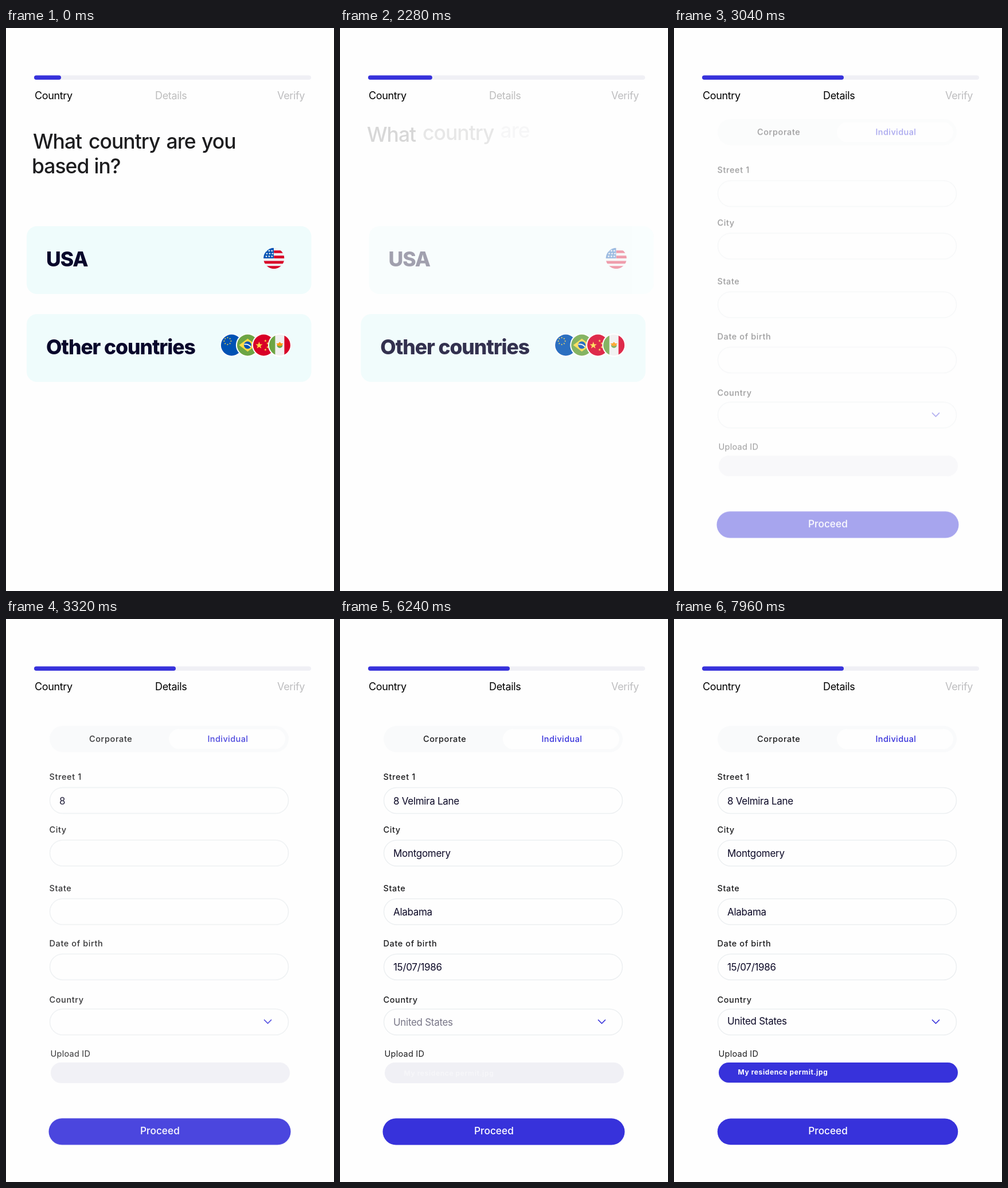
An HTML page that plays this animation: 572x980 px, repeating every 8 s.

```html
<!DOCTYPE html>
<html lang="en">
<head>
<meta charset="utf-8">
<title>Onboarding form</title>
<style>
html, body { margin: 0; width: 100%; height: 100%; overflow: hidden; background: #fefefe; }
svg { display: block; width: 100vw; height: 100vh; font-family: Inter, "Open Sans", sans-serif; }
.step { font-size: 18px; letter-spacing: -.35px; }
.heading { font-size: 35.5px; font-weight: 500; letter-spacing: -1px; fill: #1d1d1f; }
.option { font-size: 35.5px; font-weight: 800; letter-spacing: -1.1px; fill: #09072b; }
.label { font-size: 14.5px; font-weight: 500; letter-spacing: .6px; fill: #1c1c1e; }
.value { font-size: 17px; letter-spacing: -.3px; fill: #0b0826; }
.field { fill: none; stroke: #eceff1; stroke-width: 1.5; }
</style>
</head>
<body>
<svg id="stage" viewBox="0 0 572 980">
  <defs>
    <clipPath id="disc"><circle r="18.5"/></clipPath>
  </defs>

  <rect x="49" y="82.5" width="483" height="7.5" rx="3.75" fill="#f0f0f5"/>
  <rect id="progress" x="49" y="82.5" height="7.5" rx="3.75" fill="#3732db"/>
  <g class="step">
    <text x="50" y="124">Country</text>
    <text id="details" x="260" y="124">Details</text>
    <text x="473" y="124" fill="#bdbdbf">Verify</text>
  </g>

  <g id="heading" class="heading"></g>

  <g id="usa">
    <rect x="36" y="345" width="496.5" height="118" rx="18" fill="#effcfc"/>
    <text class="option" x="70" y="415">USA</text>
    <g transform="translate(467.2 401) scale(.98)" clip-path="url(#disc)">
      <circle r="18.5" fill="#f0f0f0"/>
      <path d="M0-11.8H19M0-2.4H19M-19 7H19M-19 15.9H19" stroke="#d80027" stroke-width="4.7"/>
      <path d="M-19-19H-.3V0H-19z" fill="#0052b4"/>
      <g id="usStars" fill="#f0f0f0"></g>
    </g>
  </g>

  <g id="other">
    <rect x="36" y="498" width="496.5" height="118" rx="18" fill="#effcfc"/>
    <text class="option" x="70" y="568">Other countries</text>
    <g transform="translate(393.4 552)">
      <circle r="20.5" fill="#fff"/>
      <circle r="18.5" fill="#0052b4"/>
      <g id="euStars" fill="#ffda44"></g>
    </g>
    <g transform="translate(421.4 552)">
      <circle r="20.5" fill="#fff"/>
      <circle r="18.5" fill="#6da544"/>
      <path d="M0-11.3L15 0L0 11.3L-15 0z" fill="#ffda44"/>
      <circle r="6.5" fill="#0052b4"/>
      <path d="M-6-1.2Q1-2.5 5.6 3" fill="none" stroke="#f0f0f0" stroke-width="2"/>
    </g>
    <g transform="translate(449.4 552)">
      <circle r="20.5" fill="#fff"/>
      <circle r="18.5" fill="#d80027"/>
      <g id="cnStars" fill="#ffda44"></g>
    </g>
    <g transform="translate(477.4 552)">
      <circle r="20.5" fill="#fff"/>
      <g clip-path="url(#disc)">
        <circle r="18.5" fill="#f0f0f0"/>
        <path d="M-19-19H-8V19H-19z" fill="#6da544"/>
        <path d="M8-19H19V19H8z" fill="#d80027"/>
        <path d="M-5 0A5 5 0 0 0 5 0z" fill="#6da544"/>
        <path d="M-6-3L-2.5-3L0-5.5L2.5-3L6-3L3 1.5H-3z" fill="#ff9811"/>
      </g>
    </g>
  </g>

  <g id="form">
    <rect x="76" y="186" width="417" height="46" rx="23" fill="#f9fafb"/>
    <rect x="284" y="191.5" width="203" height="35" rx="17.5" fill="#fefefe"/>
    <g class="label">
      <text x="145" y="213.5">Corporate</text>
      <text x="351.5" y="213.5" style="fill:#3732db;letter-spacing:.4px">Individual</text>
    </g>
    <g id="fields"></g>
    <path d="M450.5 698L456.5 704L462.5 698" fill="none" stroke="#3732db" stroke-width="1.7" stroke-linecap="round" stroke-linejoin="round"/>
    <text class="label" x="77.5" y="761.5" style="font-weight:400;letter-spacing:.25px">Upload ID</text>
    <rect x="78" y="772" width="417" height="36" rx="18" fill="#f0f0f5"/>
    <rect id="upload" x="78" y="772" width="417" height="35" rx="17.5" fill="#3732db"/>
    <text id="fileName" x="111.5" y="793" fill="#fff" font-size="12" font-weight="700" letter-spacing=".6">My residence permit.jpg</text>
    <g id="proceed">
      <rect x="74.5" y="869.3" width="422" height="46.2" rx="23.1" fill="#3732db"/>
      <text x="234" y="897" fill="#fff" font-size="17.3" font-weight="500">Proceed</text>
    </g>
  </g>
</svg>
<script>
const LOOP = 8000;
const $ = id => document.getElementById(id);

function add(parent, tag, attrs, text = '') {
  const node = document.createElementNS('http://www.w3.org/2000/svg', tag);
  for (const key in attrs) node.setAttribute(key, attrs[key]);
  node.textContent = text;
  parent.append(node);
  return node;
}

function star(parent, x, y, r) {
  const points = Array.from({ length: 10 }, (_, i) => {
    const a = i * Math.PI / 5 - Math.PI / 2, d = i % 2 ? r * 0.4 : r;
    return [x + d * Math.cos(a), y + d * Math.sin(a)].map(n => n.toFixed(2));
  });
  add(parent, 'polygon', { points: points.join(' ') });
}

for (let row = 0; row < 3; row++)
  for (let col = 0; col < 3; col++)
    star($('usStars'), -13.5 + col * 5 + (row % 2), -13.5 + row * 5, 2.3);
for (let i = 0; i < 8; i++)
  star($('euStars'), -7 + 6 * Math.cos(i * Math.PI / 4), -7 + 6 * Math.sin(i * Math.PI / 4), 1.6);
star($('cnStars'), -8, 0.5, 6.5);
for (const [x, y] of [[3, -7.5], [7, -3], [7, 3.5], [3, 8]]) star($('cnStars'), x, y, 2.4);

const words = [
  ['What', 47, 210], ['country', 144, 210], ['are', 279.5, 210],
  ['you', 341, 210], ['based', 45, 253], ['in?', 153.5, 253]
].map(([text, x, y]) => add($('heading'), 'text', { x, y }, text));

// label, label baseline, box top, value, typing start, ms per character
const fields = [
  ['Street 1', 280, 293.5, '8 Velmira Lane', 3320, 60],
  ['City', 371.5, 385, 'Montgomery', 4155, 60],
  ['State', 473.5, 487, 'Alabama', 4880, 105],
  ['Date of birth', 570, 583.2, '15/07/1986', 5580, 50],
  ['Country', 668, 679, 'United States']
].map(([label, y, top, value, start, pace]) => {
  add($('fields'), 'text', { class: 'label', x: 75.5, y }, label);
  add($('fields'), 'rect', { class: 'field', x: 76.5, y: top, width: 416, height: 45, rx: 22.5 });
  const node = add($('fields'), 'text', { class: 'value', x: 93, y: top + (pace ? 29 : 27.3) });
  return { node, value, start, pace };
});
const country = fields.pop().node;
country.textContent = 'United States';

const span = (t, start, length) => Math.min(1, Math.max(0, (t - start) / length));
const smooth = p => (1 - Math.cos(Math.PI * p)) / 2;
const mix = (a, b, p) => a + (b - a) * p;

function place(node, dx, dy, opacity) {
  node.setAttribute('transform', `translate(${dx} ${dy})`);
  node.setAttribute('opacity', opacity);
}

// Leaving parts speed up while fading; arriving parts slow down.
function leave(node, p, dx, dy) {
  place(node, dx * p ** 3, dy * p ** 3, 1 - p);
}
function arrive(node, p, dy) {
  place(node, 0, dy * (1 - p) ** 3, p);
}

const scaleAbout = (x, y, s) => ` translate(${x} ${y}) scale(${s}) translate(${-x} ${-y})`;

function draw(t) {
  $('progress').setAttribute('width', mix(47, 247, smooth(span(t, 1930, 910))));
  const grey = Math.round(mix(189, 0, span(t, 2640, 260)));
  $('details').setAttribute('fill', `rgb(${grey},${grey},${grey})`);

  words.forEach((word, i) => leave(word, span(t, 1926 + (5 - i) * 21, 300), 0, -21));

  const press = smooth(span(t, 1520, 320)) - smooth(span(t, 1840, 240));
  leave($('usa'), span(t, 2094, 300), 60, 0);
  if (press > 0) $('usa').setAttribute('transform', scaleAbout(284, 404, 1 - 0.0165 * press));
  leave($('other'), span(t, 2229, 300), 60, 0);

  arrive($('form'), span(t, 2780, 600), -154);
  for (const { node, value, start, pace } of fields) {
    const count = Math.max(0, Math.floor((t - start) / pace) + 1);
    node.textContent = value.slice(0, count);
  }
  arrive(country, span(t, 6120, 220), 20);
  arrive($('fileName'), span(t, 6150, 220), 8);
  $('upload').setAttribute('opacity', smooth(span(t, 6240, 500)));
  const push = 1 - 0.012 * smooth(span(t, 7760, 400));
  $('proceed').setAttribute('transform', scaleAbout(285.5, 892.4, push));
}

const begin = performance.now();
function tick() {
  draw((performance.now() - begin) % LOOP);
  requestAnimationFrame(tick);
}
tick();
</script>
</body>
</html>
```
